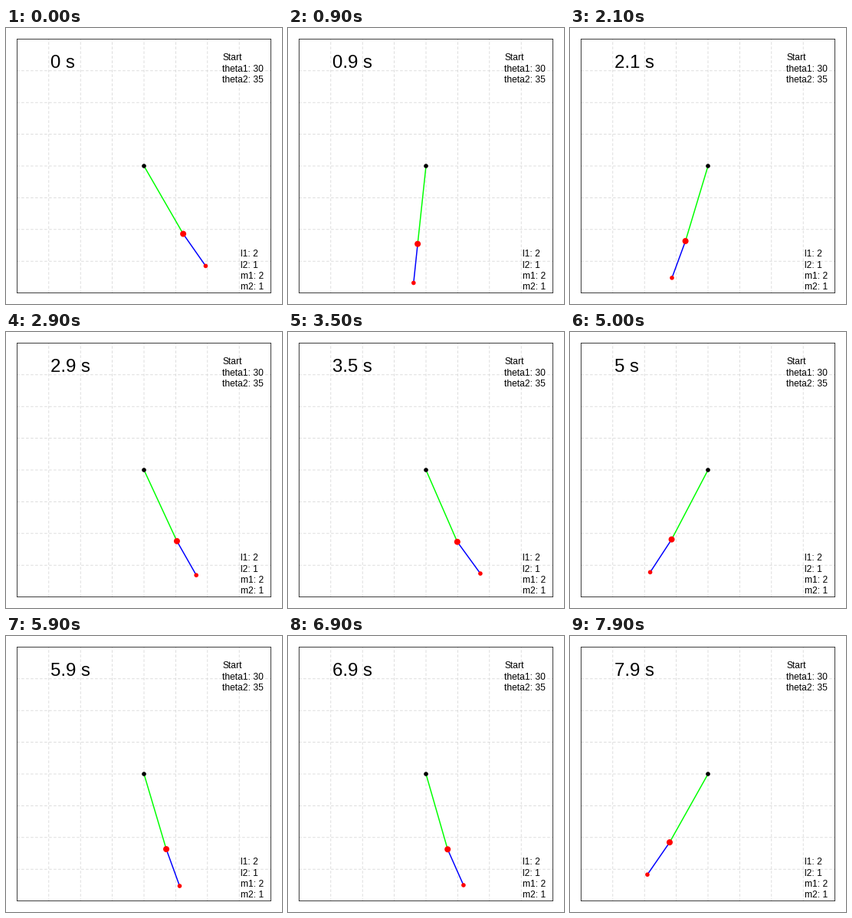
A matplotlib script for the animation above (8000 ms loop, 360x360 px).

```python
import numpy as np
import matplotlib.pyplot as plt
from matplotlib.animation import FuncAnimation
from matplotlib.patches import Circle, Rectangle

plt.rcParams["font.family"] = "Liberation Sans"

SIZE, DPI = 360, 72          # one point equals one pixel
FRAMES, STEP_MS = 80, 100
MARGIN = 14.4
SIDE = SIZE - 2 * MARGIN
SCALE = SIDE / 6.48          # pixels per metre
MID = SIZE / 2

G = 9.81
L1, L2, M1, M2 = 2, 1, 2, 1
START = 30, 35               # degrees


def slope(s):
    """Time derivative of (theta1, theta2, omega1, omega2)."""
    t1, t2, w1, w2 = s
    c, d = np.cos(t1 - t2), np.sin(t1 - t2)
    m = M1 + M2
    mass = [[m * L1, M2 * L2 * c], [L1 * c, L2]]
    force = [-M2 * L2 * w2**2 * d - m * G * np.sin(t1),
             L1 * w1**2 * d - G * np.sin(t2)]
    return np.concatenate([[w1, w2], np.linalg.solve(mass, force)])


def rk4(s, h):
    a = slope(s)
    b = slope(s + h / 2 * a)
    c = slope(s + h / 2 * b)
    d = slope(s + h * c)
    return s + h / 6 * (a + 2 * b + 2 * c + d)


def simulate(substeps=10):
    s = np.array([*np.radians(START), 0, 0])
    angles = []
    for _ in range(FRAMES):
        angles.append(s[:2])
        for _ in range(substeps):
            s = rk4(s, STEP_MS / 1000 / substeps)
    return np.array(angles)


def joint(origin, length, angle):
    x, y = origin
    return (x + SCALE * length * np.sin(angle),
            y + SCALE * length * np.cos(angle))


def label(x, y, text, size=12):
    return ax.text(x, y, text, size=size, color="black", va="baseline")


def dot(radius, color):
    return ax.add_patch(Circle((MID, MID), radius, fc=color, lw=0, zorder=4))


fig = plt.figure(figsize=(SIZE / DPI, SIZE / DPI), dpi=DPI, facecolor="white")
ax = fig.add_axes([0, 0, 1, 1])
ax.set(xlim=(0, SIZE), ylim=(SIZE, 0))
ax.axis("off")

grid = dict(color="lightgray", lw=0.75, dashes=(4, 4),
            dash_capstyle="round", snap=False, zorder=1)
lo, hi = MARGIN, SIZE - MARGIN
for k in range(1, 8):
    p = lo + k * SIDE / 8
    ax.plot([lo, hi], [p, p], **grid)
    ax.plot([p, p], [hi, lo], **grid)
ax.add_patch(Rectangle((lo, lo), SIDE, SIDE, fill=False, ec="black",
                       lw=0.75, snap=False, zorder=2))

info = ["Start", f"theta1: {START[0]}", f"theta2: {START[1]}"]
for k, text in enumerate(info):
    label(282.5, 42.4 + 14.4 * k, text)
params = [f"l1: {L1}", f"l2: {L2}", f"m1: {M1}", f"m2: {M2}"]
for k, text in enumerate(params):
    label(306.4, 298.2 + 14.4 * k, text)
clock = label(57.7, 52, "", 24)

rod1, = ax.plot([], [], color="#00ff00", lw=1.5, zorder=3)
rod2, = ax.plot([], [], color="#0000ff", lw=1.5, zorder=3)
pivot = dot(2.8, "black")
bob1 = dot(4, "red")
bob2 = dot(2.8, "red")

path = simulate()


def draw(i):
    a1, a2 = path[i]
    p0 = MID, MID
    p1 = joint(p0, L1, a1)
    p2 = joint(p1, L2, a2)
    rod1.set_data(*zip(p0, p1))
    rod2.set_data(*zip(p1, p2))
    bob1.center, bob2.center = p1, p2
    clock.set_text(f"{i / 10:g} s")
    return rod1, rod2, bob1, bob2, clock


anim = FuncAnimation(fig, draw, frames=FRAMES, interval=STEP_MS,
                     repeat=True, repeat_delay=0, blit=False)
plt.show()
```
